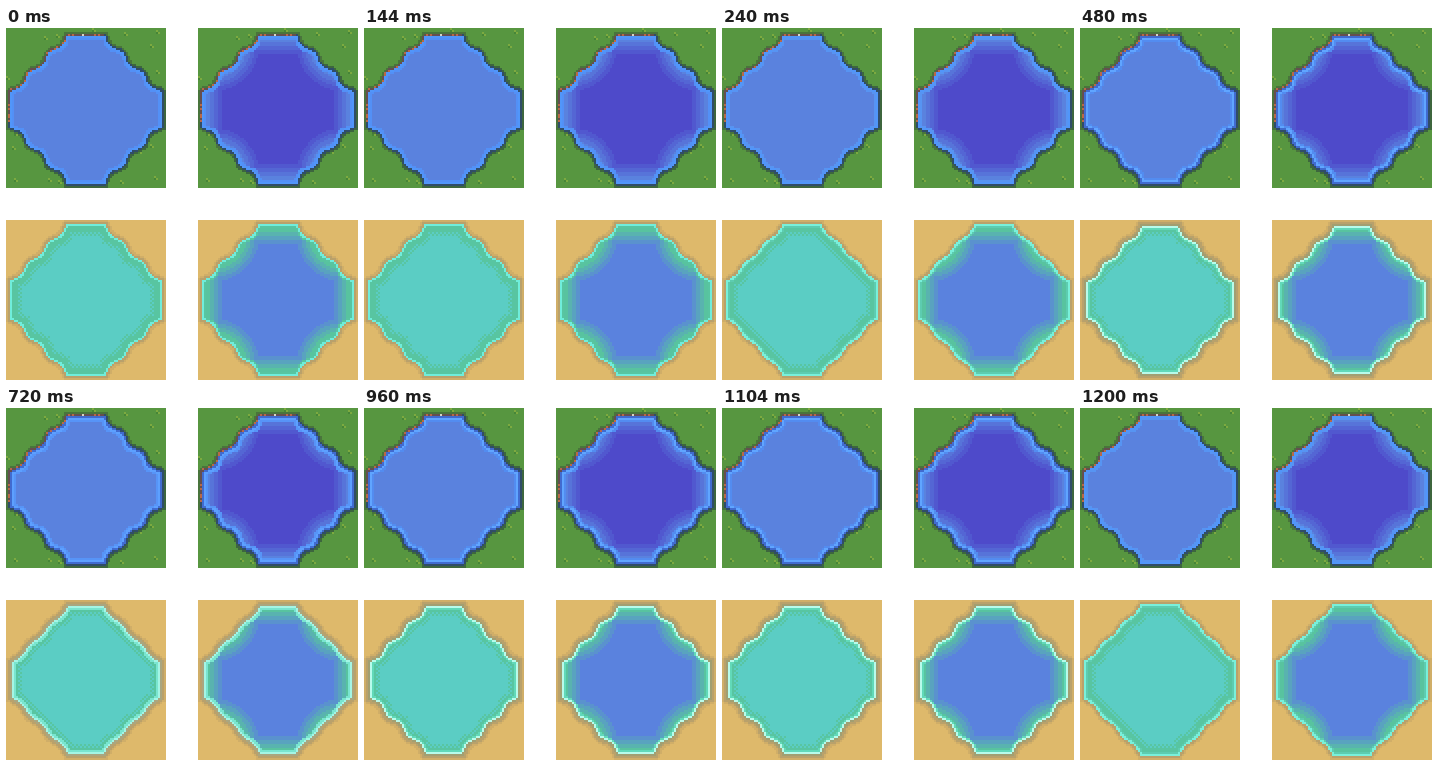
An HTML page with a canvas that plays this animation: 352 by 352 pixels, repeating every 1440 ms.

```html
<!DOCTYPE html>
<html lang="en">
<head>
<meta charset="utf-8">
<title>Four ponds</title>
<style>
html, body { margin: 0; width: 100%; height: 100%; overflow: hidden; background: #fff; }
canvas { display: block; width: 352px; height: 352px; image-rendering: pixelated; }
</style>
</head>
<body>
<canvas width="176" height="176"></canvas>
<script>
const ctx = document.querySelector('canvas').getContext('2d');
const SIZE = 80, GAP = 16, STEP = 240, CELL = 8;

// Rim colours from the shore inwards, one pixel each, for each wave step
const grassRims = [
  ['#5196fa', '#5390f6'],
  ['#5196fa', '#5794f2'],
  ['#416bd0', '#60a5ff', '#538cf0'],
  ['#416bd0', '#5da0ff', '#5794f7']
];
const sandRims = [
  ['#70eddb', '#58c5a1'],
  ['#79f0da', '#5dccb0'],
  ['#a19f72', '#b8fbeb', '#61d9b9'],
  ['#a9a680', '#a4f5e5', '#79e5d0']
];
const sandShade = ['#b9a16b', '#d0ae68'];
const violet = [78, 74, 202], blue = [90, 130, 222], teal = [88, 195, 159];

const mix = (a, b, k) => `rgb(${a.map((n, i) => Math.round(n + (b[i] - n) * k))})`;

const noise = (x, y) => {
  const n = Math.sin(x * 127.1 + y * 311.7) * 43758.5453;
  return n - Math.floor(n);
};

// Distance to a wavy octagonal shore, positive inside the water
function shoreDistance(u, v, halfHeight, corner, wave) {
  const slant = (corner - u - v) / Math.SQRT2 - wave * Math.cos((u - v) * Math.PI / 10);
  return Math.min(38 - u, halfHeight - v, slant);
}

// Rounded cross of deep water with bands around it
function depthColor(u, v, deep, shallow) {
  const out = Math.max(u - 27.5, v - 27.5, 22.5 - Math.hypot(u - 32, v - 32));
  return mix(deep, shallow, Math.max(0, Math.min(4, Math.ceil(out / 2))) / 4);
}

// At most one slanted blade pair per cell
function turfColor(x, y) {
  const col = Math.floor(x / CELL), row = Math.floor(y / CELL);
  if (noise(col + 3, row) < 0.55) {
    const dx = x % CELL - Math.floor(noise(col, row + 9) * 6);
    const dy = y % CELL - Math.floor(noise(col + 5, row + 2) * 6);
    if (dx === dy && (dx === 0 || dx === 1)) return '#7daa40';
    if (dx === 0 && dy === 1) return '#468637';
  }
  return '#579640';
}

function grassColor(x, y, step, deep) {
  const u = Math.abs(x - 39.5), v = Math.abs(y - 40.2);
  const d = shoreDistance(u, v, 37, 45.3, 1.1);
  if (d >= 0) {
    return grassRims[step][Math.floor(d)] ||
      (deep ? depthColor(u, v, violet, blue) : mix(blue, blue, 0));
  }
  const stony = y < 9 && x < 49 || x + y < 48;
  if (d > -1) {
    if (stony && noise(x, y) > 0.65) return noise(y, x) > 0.75 ? '#d7d5c4' : '#b96848';
    return stony ? '#654f50' : '#304d68';
  }
  if (d > -2) return x + y > 80 ? '#3d663e' : '#49743c';
  return turfColor(x, y);
}

function sandColor(x, y, step, deep) {
  const u = Math.abs(x - 39.5), v = Math.abs(y - 39.5);
  const d = shoreDistance(u, v, 38, 46.6, step % 2 ? 0.5 : 0.9);
  if (d < 0) return sandShade[Math.floor(-d)] || '#deb96b';
  const rim = sandRims[step][Math.floor(d)];
  if (rim) return rim;
  if (deep) return depthColor(u, v, blue, teal);
  return d < 4 || d < 6 && (x + y) % 2 ? '#58c5a1' : '#5bcdc4';
}

function paint(step) {
  const scene = document.createElement('canvas');
  scene.width = scene.height = 2 * SIZE + GAP;
  const g = scene.getContext('2d');
  g.fillStyle = '#fff';
  g.fillRect(0, 0, scene.width, scene.height);
  [grassColor, sandColor].forEach((color, row) => {
    for (let col = 0; col < 2; col++)
      for (let y = 0; y < SIZE; y++)
        for (let x = 0; x < SIZE; x++) {
          g.fillStyle = color(x, y, step, col === 1);
          g.fillRect(col * (SIZE + GAP) + x, row * (SIZE + GAP) + y, 1, 1);
        }
  });
  return scene;
}

const scenes = [0, 1, 2, 3].map(paint);
const start = performance.now();

// The waves run 0 1 2 3 2 1 and repeat
function draw() {
  const beat = Math.floor((performance.now() - start) / STEP) % 6;
  ctx.drawImage(scenes[3 - Math.abs(3 - beat)], 0, 0);
  requestAnimationFrame(draw);
}
draw();
</script>
</body>
</html>
```
